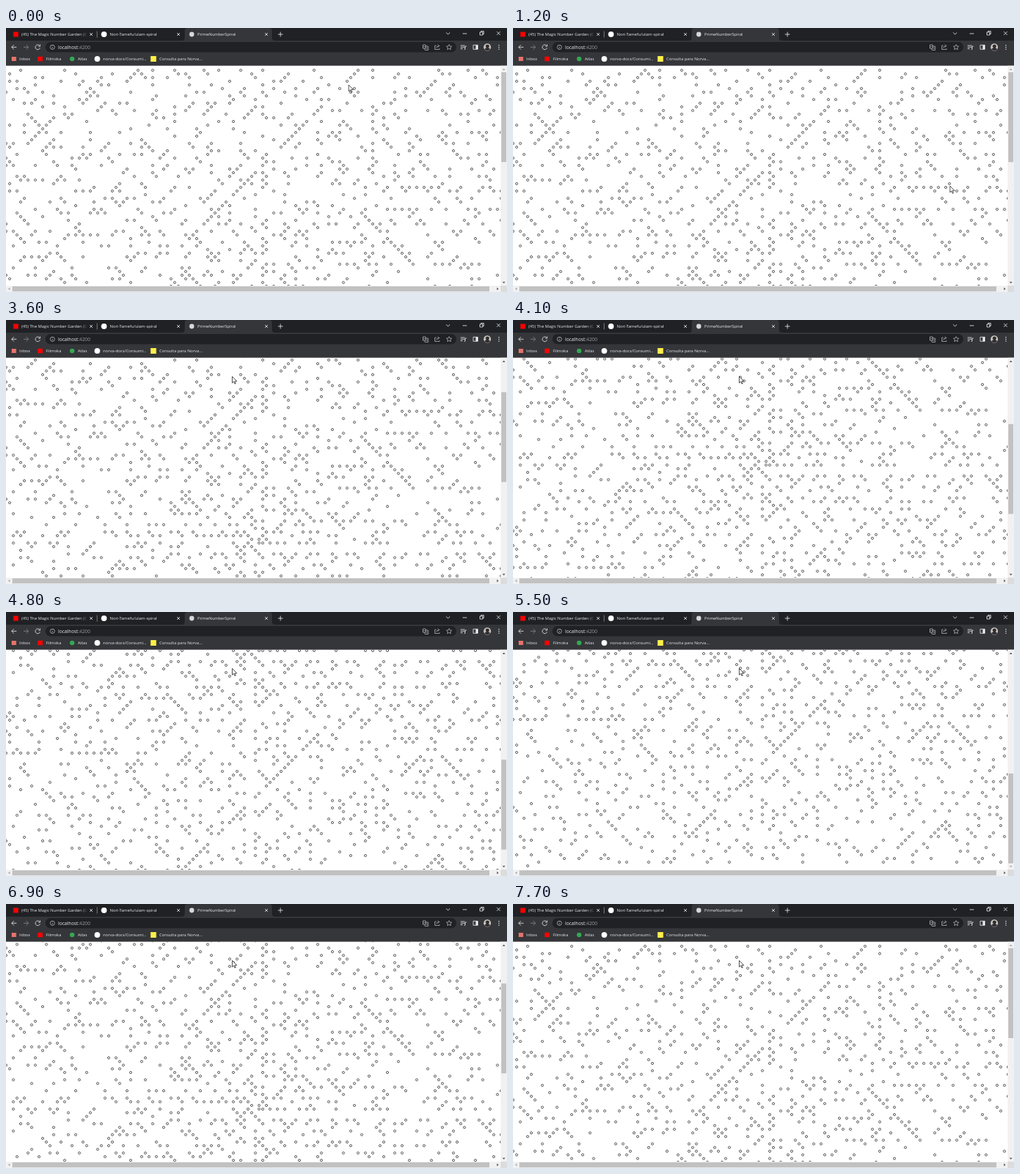
Write an HTML page that moves like this. It is 712 px wide and 376 px high and loops after 8000 ms.

```html
<!DOCTYPE html>
<html lang="en">
<head>
<meta charset="utf-8">
<title>Prime spiral in a browser</title>
<style>
  html, body { margin: 0; width: 100%; height: 100%; overflow: hidden; background: #fff; }
  #stage { display: block; width: 712px; height: 376px; }
  text { font: 5.9px "Open Sans", "Noto Sans", sans-serif; fill: #e8eaed; white-space: pre; }
  .line { fill: none; stroke: #e8eaed; stroke-width: .85; }
  .dim { stroke: #85878a; }
</style>
</head>
<body>
<svg id="stage" viewBox="0 0 712 376">
  <defs>
    <path id="close" class="line" d="M-2-2 2 2M2-2-2 2"/>
    <linearGradient id="fade"><stop offset=".8" stop-color="#202124" stop-opacity="0"/><stop offset="1" stop-color="#202124"/></linearGradient>
  </defs>

  <svg y="53.7" width="703" height="313.3">
    <path id="dots" fill="#fff" stroke="#1c1c1c" stroke-width=".75"/>
  </svg>

  <!-- tab strip -->
  <rect width="712" height="18" fill="#202124"/>
  <path d="M250 18q4 0 4-4V4q0-4 4-4H374q4 0 4 4V14q0 4 4 4z" fill="#35363a"/>
  <rect x="10.5" y="5.5" width="7" height="7" fill="#f00"/>
  <text x="22" y="11">(45) The Magic Number Garden (C</text>
  <rect x="60" y="2" width="57" height="14" fill="url(#fade)"/>
  <path class="line dim" d="M129.5 4.5V13.5"/>
  <circle cx="139.3" cy="9" r="4" fill="#fff"/>
  <text x="147.5" y="11">Nori-Tamefu/ulam-spiral</text>
  <circle cx="264" cy="9" r="3.4" fill="#d5d7da"/>
  <text x="272" y="11">PrimeNumberSpiral</text>
  <use href="#close" x="121" y="9"/>
  <use href="#close" x="245" y="9"/>
  <use href="#close" x="370" y="9"/>
  <path class="line" d="M386.5 9h7M390 5.500v7M625.500 6.500l2.700 2.500 2.700-2.500M649 8h6M673.500 6h4v4h-4zM675 6V4.500h4V8.500h-1.500M697.500 5l5 5m0-5l-5 5"/>

  <!-- toolbar -->
  <rect y="18" width="712" height="35.7" fill="#35363a"/>
  <rect x="56" y="20" width="584" height="14.500" rx="7.200" fill="#202124"/>
  <path class="line" d="M15 27.300H8m3.300-3.300L8 27.300l3.300 3.300M47.600 25a3.400 3.400 0 1 0 .8 3.200M48.500 23.500v2.500h-2.600"/>
  <path class="line dim" d="M25 27.300h7m-3.300-3.300l3.300 3.300-3.300 3.300"/>
  <g class="line" style="stroke:#bdc1c6;stroke-width:.75">
    <circle cx="66" cy="27.300" r="3.200"/>
    <path d="M66 27v2.200M66 25.200v.9"/>
    <path d="M592.500 24h4v5h-4zM596.500 26h3.500v5.500h-4.500l-.8-2.500M593.500 26.500h2M598.300 27.500v2.500"/>
    <path d="M611.500 25h-2v5.500h6.500v-1.500M611.500 28.500q.5-3 4-3m-1.700-2l2 2-2 2"/>
    <path d="M629.700 23.500l1.100 2.400 2.700.3-2 1.800.6 2.700-2.400-1.400-2.400 1.400.6-2.700-2-1.800 2.700-.3z"/>
  </g>
  <path class="line" d="M646 25h6M646 27.300h6M646 29.600h3M652.500 26v4.200h-1.500M652.500 26h2M664 24.300h6.500v6H664z"/>
  <path d="M667.500 24.300h3v6h-3z" fill="#e8eaed"/>
  <circle cx="684" cy="27.300" r="5.200" fill="#c9c6c0"/>
  <path d="M680 30.600q1-2.300 3-2.300a2.600 2.600 0 1 1 2.400 0q2 0 2.600 2.300-4 3.400-8 0z" fill="#302c2e"/>
  <path d="M700.500 24v1.300m0 1.400V28m0 1.400v1.300" stroke="#e8eaed" stroke-width="1.300"/>
  <text x="74" y="29.700" style="font-size:6.800px">localhost<tspan fill="#9aa0a6">:4200</tspan></text>

  <!-- bookmarks -->
  <rect x="8" y="41" width="6.500" height="6" fill="#e6736a"/>
  <text x="19" y="46">Inbox</text>
  <rect x="45" y="40.700" width="7" height="6.500" fill="#f00"/>
  <text x="57" y="46">Filmoka</text>
  <circle cx="94" cy="44" r="3.300" fill="#34a853"/>
  <text x="102" y="46">Atlas</text>
  <circle cx="129.700" cy="44" r="4" fill="#fff"/>
  <text x="138" y="46">norva-docs/Consumi...</text>
  <rect x="205.500" y="40" width="8" height="8" fill="#fff04a"/>
  <text x="218" y="46">Consulta para Norva...</text>

  <!-- scrollbars -->
  <path d="M703 53.700h9V367h-9zM0 367h703v9H0z" fill="#f1f1f1"/>
  <rect x="703" y="367" width="9" height="9" fill="#dcdcdc"/>
  <rect x="9" y="368" width="678" height="7.200" fill="#c1c1c1"/>
  <rect id="thumb" x="704" width="7" height="128" fill="#c1c1c1"/>
  <path id="upArrow" d="M705.500 60l2-2.300 2 2.300z"/>
  <path id="downArrow" d="M705.500 361.500l2 2.300 2-2.300z"/>
  <path d="M5.500 369.500l-2.300 2 2.300 2z" fill="#a3a3a3"/>
  <path d="M697.700 369.500l2.300 2-2.300 2z" fill="#505050"/>

  <path id="cursor" d="M0 0V9.200l2.100-2 1.500 3.300 1.400-.6-1.500-3.200h3z" fill="#fff" stroke="#000" stroke-width=".7"/>
</svg>

<script>
const LOOP = 8000, STEP = 100;
const CELL = 5.212, RADIUS = 1.6, LAST_NUMBER = 18659;
const CENTER = { x: 68 * CELL, y: 360.9 };
const MAX_SCROLL = 407.5;
const THUMB = { top: 63, travel: 167 };

// Rows of [time, value, ...]; values run linearly between rows.
const SCROLL = [
  [3200, 0], [3300, 14], [3600, 97], [4100, 208], [4200, 208],
  [4700, 347], [4800, 359.6], [5100, 364.8], [5500, MAX_SCROLL],
  [5900, MAX_SCROLL], [6400, 242.6], [6800, 147], [7400, 0]
];
const POINTER = [
  [200, 487, 81], [600, 86, 28], [1000, 621, 219], [1199, 621, 219],
  [1200, 621, 225], [1599, 621, 225], [1600, 476, 122],
  [2000, 476, 122], [2300, 340, 78], [2400, 321.5, 80.5]
];

const el = id => document.getElementById(id);

function valuesAt(rows, t) {
  const next = rows.findIndex(row => row[0] > t);
  if (next === 0) return rows[0].slice(1);
  if (next < 0) return rows[rows.length - 1].slice(1);
  const a = rows[next - 1], b = rows[next];
  const k = (t - a[0]) / (b[0] - a[0]);
  return a.slice(1).map((v, i) => v + (b[i + 1] - v) * k);
}

function isPrime(n) {
  if (n < 2) return false;
  for (let d = 2; d * d <= n; d++) if (n % d === 0) return false;
  return true;
}

function spiralPath() {
  const ring = `a${RADIUS} ${RADIUS} 0 1 0 `;
  let path = '', x = 0, y = 0, dx = 1, dy = 0, n = 1;
  for (let side = 1; n <= LAST_NUMBER; side += 0.5) {
    for (let i = 0; i < Math.floor(side) && n <= LAST_NUMBER; i++, n++) {
      if (isPrime(n)) {
        const left = CENTER.x + x * CELL - RADIUS, top = CENTER.y + y * CELL;
        path += `M${left.toFixed(2)} ${top.toFixed(2)}${ring}${2 * RADIUS} 0${ring}${-2 * RADIUS} 0`;
      }
      x += dx;
      y += dy;
    }
    [dx, dy] = [dy, -dx];
  }
  return path;
}

function draw(now) {
  const t = Math.floor((now % LOOP) / STEP) * STEP;
  const [scroll] = valuesAt(SCROLL, t);
  el('dots').setAttribute('transform', `translate(0 ${-scroll})`);
  el('thumb').setAttribute('y', THUMB.top + THUMB.travel * scroll / MAX_SCROLL);
  el('upArrow').setAttribute('fill', scroll > 0 ? '#505050' : '#a3a3a3');
  el('downArrow').setAttribute('fill', scroll < MAX_SCROLL ? '#505050' : '#a3a3a3');
  el('cursor').setAttribute('transform', `translate(${valuesAt(POINTER, t)})`);
}

el('dots').setAttribute('d', spiralPath());
const start = performance.now();
function tick() {
  draw(performance.now() - start);
  requestAnimationFrame(tick);
}
tick();
</script>
</body>
</html>
```
